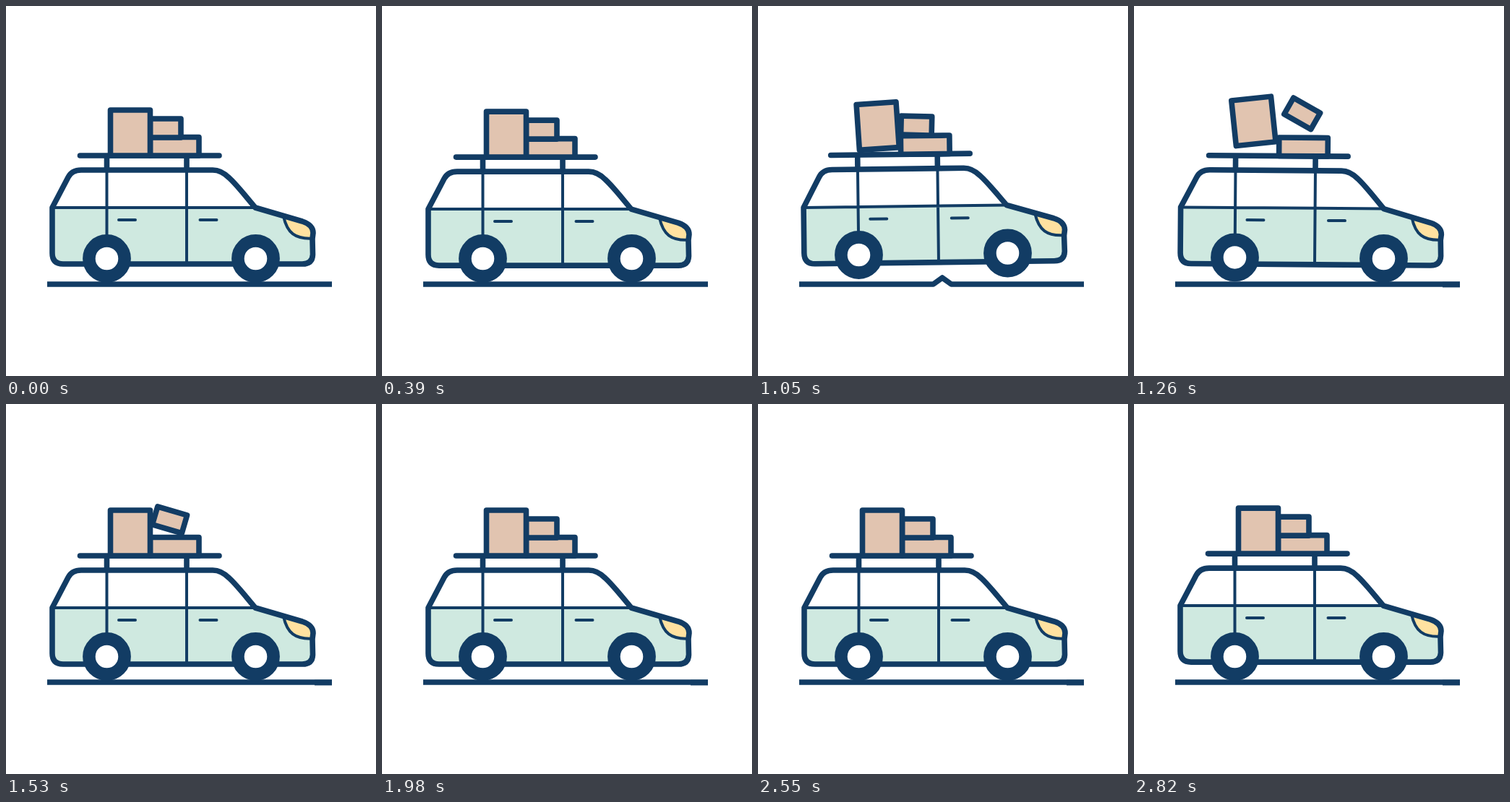
Animation, 512 px wide and 512 px high, one loop 2850 ms. Source, as an HTML page:

```html
<!DOCTYPE html>
<html lang="en">
<head>
<meta charset="utf-8">
<title>Packed car</title>
<style>
  html, body { margin: 0; width: 100%; height: 100%; overflow: hidden; background: #fff; }
  svg { display: block; width: 100vw; height: 100vh; }
  .line { fill: none; stroke: #123c64; stroke-width: 7.6; stroke-linejoin: round; }
  .thin { stroke-width: 4; }
  .round { stroke-linecap: round; }
  .box { fill: #e1c4b0; }
  .wheel { fill: #fff; stroke-width: 17.6; }
</style>
</head>
<body>
<svg viewBox="0 0 512 512">
  <defs>
    <clipPath id="roadClip"><path d="M57 360H451V400H57Z"/></clipPath>
  </defs>
  <g clip-path="url(#roadClip)"><path id="road" class="line"/></g>
  <path id="roadEnd" class="line" d="M427 385.6H451"/>
  <g id="car">
    <path class="line" d="M139.5 207V227M250 207V227"/>
    <path class="line round" d="M102.5 207H295"/>
    <path class="line box" d="M199.5 181.5H267V207H199.5Z"/>
    <path id="small" class="line box" d="M199.5 156H242V182H199.5Z"/>
    <path id="big" class="line box" d="M144.5 144H199.5V207H144.5Z"/>
    <path fill="#cfe9e0" d="M64 279H345L410 298Q425 303 425 314V344Q424 357 410 357H79Q64 357 64 342Z"/>
    <path class="line thin" fill="none" d="M64 279H345M139.5 227V330M250 227V357"/>
    <path class="line thin round" d="M156 296H179M268.5 296H291.5"/>
    <path class="line thin" style="fill:#ffe1a0" d="M384 291L410 298Q425 303 425 314V321.5C400 323 389 314 384 291Z"/>
    <path class="line" d="M64 279L86 237Q91 227 104 227H286Q298 227 309 238C320 248 333 265 345 279L410 298Q425 303 425 314L424 322L424.5 344Q424 357 410 357H79Q64 357 64 342Z"/>
  </g>
  <circle id="rear" class="line wheel" cx="139.5" cy="349.5" r="24.6"/>
  <circle id="front" class="line wheel" cx="345.5" cy="349.5" r="24.6"/>
</svg>
<script>
const LOOP = 2850, STEP = 30, BOB = 570;
const el = id => document.getElementById(id);
const place = (id, value) => el(id).setAttribute("transform", value);
const progress = (t, from, to) => Math.min(1, Math.max(0, (t - from) / (to - from)));
const pulse = (t, from, to) => Math.sin(Math.PI * progress(t, from, to));
const toss = (t, from, to) => {
  const u = progress(t, from, to);
  return 4 * u * (1 - u);
};

function draw(t) {
  // The bump runs from right to left under the car.
  const x = 255 - (t - 1050) * 1.1;
  el("road").setAttribute("d", x > -20 && x < 470
    ? `M-60 385H${x - 12.5}L${x} 376L${x + 12.5} 385H560`
    : "M0 385H512");
  el("roadEnd").style.display = t >= 1110 ? "" : "none";

  const front = 7.7 * pulse(t, 890, 1170);
  const rear = 7.5 * pulse(t, 980, 1280);
  place("front", `translate(0 ${-front})`);
  place("rear", `translate(0 ${-rear})`);

  const bob = 1.5 * (1 - Math.cos(2 * Math.PI * t / BOB));
  const dip = 1.1 * pulse(t, 1300, 1640);
  const y = Math.min(3, bob + dip) - 0.235 * (front + rear);
  const tilt = Math.atan2(rear - front, 206) * 180 / Math.PI;
  place("car", `translate(0 ${y}) rotate(${tilt} 245 357)`);

  const big = toss(t, 1005, 1375);
  place("big", `translate(${-9.4 * big} ${-19 * big}) rotate(${-7.5 * big} 172 175.5)`);
  const small = toss(t, 1040, 1620);
  place("small", `translate(${11 * small} ${-22 * small}) rotate(${31 * small} 221 169)`);
}

const start = performance.now();
function tick() {
  const t = (performance.now() - start) % LOOP;
  draw(Math.floor(t / STEP) * STEP);
  requestAnimationFrame(tick);
}
tick();
</script>
</body>
</html>
```
